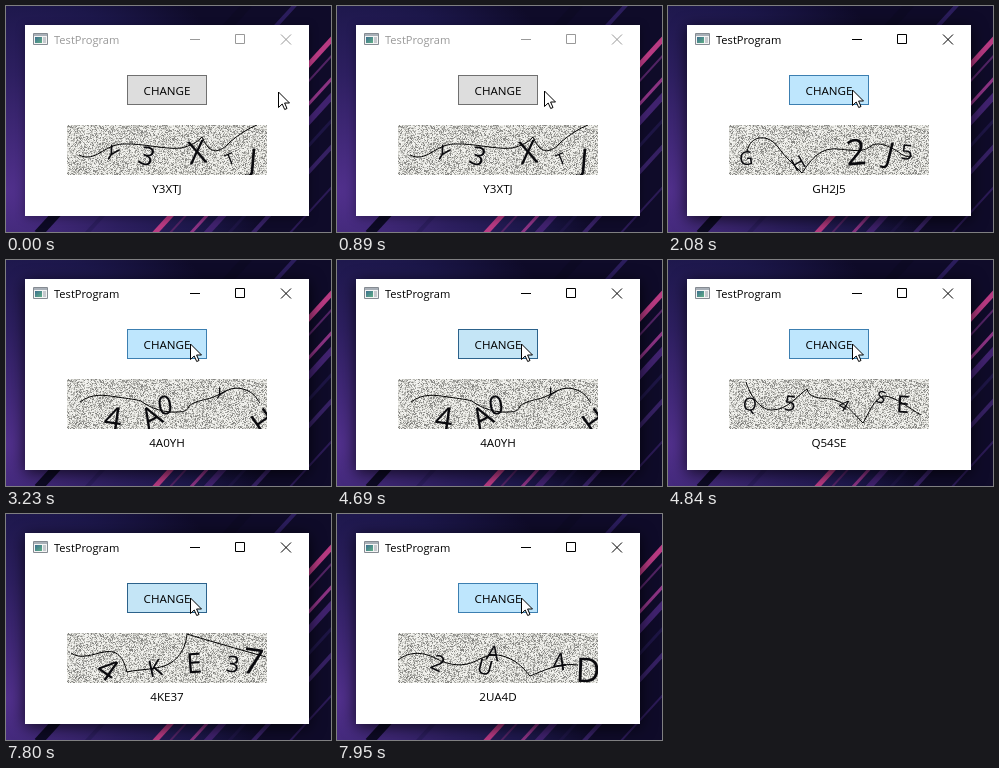
Write an HTML page that moves like this. It is 325 px wide and 226 px high and loops after 8 s.

```html
<!DOCTYPE html>
<html lang="en">
<head>
<meta charset="utf-8">
<title>TestProgram</title>
<style>
  html, body { margin: 0; width: 100%; height: 100%; overflow: hidden; background: #100c2a; }
  svg { display: block; width: 100vw; height: 100vh; }
  text { font-family: "Open Sans", "Noto Sans", sans-serif; font-size: 11.6px; }
  #captcha { fill: none; stroke: #000; }
  #captcha text { fill: #0a0a0e; stroke: none; }
  #frame { fill: #fff; filter: drop-shadow(0 2px 5px rgba(0,0,0,.35)); }
  #title { fill: #999; font-size: 11.1px; }
  #controls { fill: none; stroke: #999; }
  .active #frame { filter: drop-shadow(0 3px 8px rgba(0,0,0,.75)); }
  .active #title { fill: #000; }
  .active #controls { stroke: #000; }
  #button { fill: #ddd; stroke: #707070; }
  #button.hover { fill: #bee6fd; stroke: #3c7fb1; }
  #button.pressed { fill: #c4e5f6; stroke: #2c628b; }
</style>
</head>
<body>
<svg id="stage" viewBox="0 0 325 226">
  <defs>
    <radialGradient id="glow" gradientUnits="userSpaceOnUse" cx="0" cy="185" r="260">
      <stop offset="0" stop-color="#51308c"/>
      <stop offset=".45" stop-color="#2d1f60"/>
      <stop offset=".75" stop-color="#1c174a"/>
      <stop offset="1" stop-color="#0f0b29"/>
    </radialGradient>
    <linearGradient id="pane" x2="1" y2="1">
      <stop offset="0" stop-color="#3c6f8f"/>
      <stop offset="1" stop-color="#5fae86"/>
    </linearGradient>
    <clipPath id="area"><path d="M61 119h200v50h-200z"/></clipPath>
  </defs>

  <path fill="url(#glow)" d="M0 0h325v226H0z"/>
  <g id="streaks"></g>

  <path id="frame" d="M19 19h284v191H19z"/>
  <g>
    <path fill="#f4f4f4" stroke="#858b92" d="M27.5 27.5h14v11h-14z"/>
    <path fill="#a9b0b8" d="M28 28h13v2H28z"/>
    <path fill="url(#pane)" d="M29 31h7v6h-7z"/>
    <path fill="#c5c9ce" d="M37 31h3v6h-3z"/>
  </g>
  <text id="title" x="48" y="38">TestProgram</text>
  <path id="controls" d="M184 33.5h10M229.5 28.5h9v9h-9zM275 28.500l10 10M285 28.500l-10 10"/>

  <rect id="button" x="121.500" y="69.500" width="79" height="29"/>
  <text x="161" y="89" text-anchor="middle">CHANGE</text>

  <path fill="#f3f3ef" d="M61 119h200v50h-200z"/>
  <g id="noise" shape-rendering="crispEdges"></g>
  <g id="captcha" clip-path="url(#area)"></g>
  <text id="label" x="161" y="187" text-anchor="middle"></text>

  <path id="cursor" fill="#fff" stroke="#000" d="M.5 1V16.500L4.200 13 6.700 18.500 9 17.500 6.600 12H11.500Z"/>
</svg>
<script>
const LOOP = 8000;
const $ = id => document.getElementById(id);

// Diagonal light streaks: x at the bottom edge, width, colour
const streak = (x, w, color) =>
  `<path stroke="${color}" stroke-width="${w}" d="M${x} 228l210 -230"/>`;
$("streaks").innerHTML =
  streak(32, 9, "#0d0a24") + streak(80, 4, "#2b1d5c") + streak(148, 5, "#b83a82") +
  streak(163, 2, "#522364") + streak(184, 3, "#8a3282") + streak(200, 6, "#40226e") +
  streak(222, 3, "#1d1544") + streak(246, 4, "#352062") + streak(283, 2, "#2b1a55");

// Seeded grey grain over the captcha area
let seed = 7;
const random = () => (seed = seed * 16807 % 2147483647) / 2147483647;
const greys = ["", "#e2e2dd", "#cfcfca", "#b9b9b4", "#9f9f9b", "#858582"];
const grain = greys.map(() => "");
for (let y = 119; y < 169; y++)
  for (let x = 61; x < 261; x++)
    grain[Math.floor(random() ** 1.5 * greys.length)] += `M${x} ${y}h1v1h-1z`;
$("noise").innerHTML = greys.map((c, i) => c && `<path fill="${c}" d="${grain[i]}"/>`).join("");

// Each spot: centre x, centre y, font size, rotation
const card = (start, code, curve, ...spots) => ({
  start, code,
  art: `<path d="${curve}"/>` + spots.map(([x, y, size, turn], i) =>
    `<text transform="translate(${x} ${y}) rotate(${turn})" y="${size * .36}"
      text-anchor="middle" style="font-size:${size}px">${code[i]}</text>`).join("")
});
const cards = [
  card(0, "Y3XTJ", "M73 149C90 157 97 139 117 138S160 144 175 142Q189 139 196 131C204 150 214 147 224 136Q238 124 251 119",
    [106, 147, 20, 32], [141, 150, 26, 20], [191, 146, 32, -8], [224, 153, 16, -22], [247, 154, 32, 5]),
  card(2080, "GH2J5", "M79 146C82 128 101 128 110 141C117 151 127 160 134 167C141 157 150 141 170 143S195 146 203 140S227 143 233 148Q238 152 244 150",
    [78, 152, 19, -5], [130, 157, 18, -30], [188, 146, 36, -5], [222, 147, 30, 14], [239, 146, 21, 5]),
  card(3230, "4A0YH", "M74 142C86 133 98 135 111 137S128 139 135 141C145 149 160 153 172 152Q182 152 183 146C190 140 202 140 210 136S226 126 237 129S250 138 254 143",
    [107, 158, 31, 8], [145, 157, 30, -30], [159, 145, 26, -10], [214, 134, 15, 30], [257, 161, 30, -35]),
  card(4840, "Q54SE", "M78 122C84 140 94 150 104 150C119 150 128 137 139 129C142 141 158 137 167 140C178 143 186 154 195 163C200 155 206 138 216 136C227 136 242 149 253 155",
    [82, 144, 18, 4], [122, 143, 21, 8], [176, 145, 16, 30], [213, 137, 17, 15], [235, 144, 24, 4]),
  card(6240, "4KE37", "M65 139C75 146 87 140 98 138C114 135 118 147 121 158C134 155 151 156 163 150C175 143 180 132 181 120C200 126 232 135 260 143",
    [102, 155, 31, 35], [149, 154, 23, -12], [188, 149, 28, -4], [227, 150, 23, 8], [247, 147, 36, 8]),
  card(7950, "2UA4D", "M61 146C74 136 88 139 98 144C113 152 126 153 139 147C150 141 158 139 169 143C182 148 187 155 193 162C204 158 222 148 241 151",
    [101, 149, 22, 25], [148, 153, 21, 15], [156, 139, 21, 10], [222, 148, 24, -8], [251, 156, 34, 2])
];

// Pointer stops: time, x, y
const stops = [[0, 272, 85], [590, 267, 84], [740, 240, 84], [890, 207, 84], [1010, 187, 83], [1150, 184, 83]];
const presses = [[1930, 2080], [4690, 4840], [6120, 6240], [7800, 7950]];

let shown;
function draw(now) {
  const t = now % LOOP;
  const [, x, y] = stops.findLast(s => s[0] <= t);
  $("cursor").setAttribute("transform", `translate(${x} ${y})`);
  $("stage").setAttribute("class", t >= 1930 ? "active" : "");
  const pressed = presses.some(([from, to]) => t >= from && t < to);
  $("button").setAttribute("class", pressed ? "pressed" : t >= 1010 ? "hover" : "");
  const current = cards.findLast(c => c.start <= t);
  if (current !== shown) {
    shown = current;
    $("captcha").innerHTML = current.art;
    $("label").textContent = current.code;
  }
  requestAnimationFrame(draw);
}
draw(performance.now());
</script>
</body>
</html>
```
